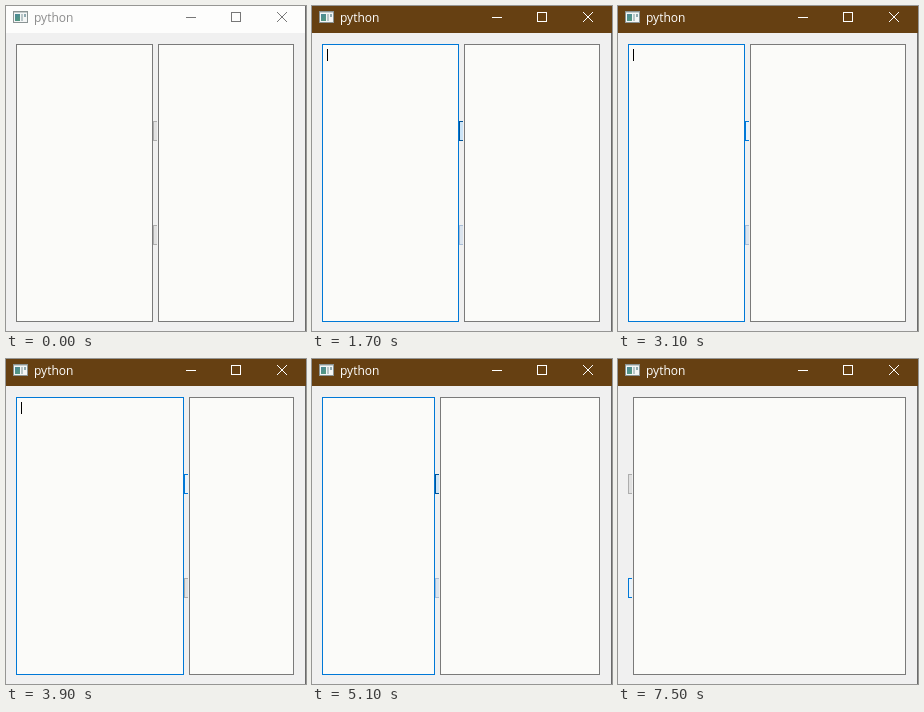
Recreate the animation shown at these times as an HTML page with a canvas. Size 300 px wide and 325 px high, loop 8000 ms.

```html
<!DOCTYPE html>
<html lang="en">
<head>
<meta charset="utf-8">
<title>Splitter window</title>
<style>
  html, body { margin: 0; width: 100%; height: 100%; overflow: hidden; background: #f0f0f0; }
  canvas { display: block; }
</style>
</head>
<body>
<canvas id="stage" width="300" height="325"></canvas>
<script>
const ctx = document.getElementById('stage').getContext('2d');
const LOOP = 8000;
const ACTIVATED = 1700;

// Each track is a list of [start time, value]; values hold until the next entry.
const handleTrack = [
  [0, 147], [1900, 141], [2000, 130], [2100, 122], [2200, 115], [2300, 94], [2400, 82], [2700, 81],
  [3100, 127], [3200, 170], [3300, 212], [3500, 283],
  [3900, 178], [4000, 94], [4100, 10],
  [4900, 81], [5000, 94], [5100, 123], [5300, 141], [5400, 161],
  [6600, 81], [6700, 10]
];
const caretTrack = [
  [0, false], [1700, true], [2200, false], [2700, true], [3200, false],
  [3700, true], [5100, false], [5600, true], [6100, false], [6600, true]
];
const topTrack = [
  [0, 'normal'], [800, 'hover'], [1700, 'pressed'], [1900, 'hover'],
  [5100, 'pressed'], [5600, 'hover'], [6100, 'pressed'], [6600, 'hover'], [7100, 'normal']
];
const bottomTrack = [
  [0, 'normal'], [1700, 'tinted'], [1900, 'normal'], [3100, 'tinted'], [3200, 'normal'],
  [5100, 'tinted'], [5300, 'normal'], [7500, 'hover']
];
const buttonColors = {
  normal: ['#e1e1e1', '#adadad'],
  hover: ['#e9f3fb', '#0078d7'],
  pressed: ['#cce4f7', '#005499'],
  tinted: ['#dbe4ee', '#a9bdd6']
};

function valueAt(track, t) {
  let value;
  for (const [start, v] of track) if (start <= t) value = v;
  return value;
}

function fill(x, y, w, h, color) {
  ctx.fillStyle = color;
  ctx.fillRect(x, y, w, h);
}

function frame(x, y, w, h, inside, border) {
  fill(x, y, w, h, border);
  fill(x + 1, y + 1, w - 2, h - 2, inside);
}

function drawIcon() {
  frame(7, 5, 15, 12, '#f4f6f6', '#8b9494');
  fill(8, 6, 13, 1, '#c5cccc');
  const teal = ctx.createLinearGradient(9, 8, 14, 15);
  teal.addColorStop(0, '#4b8798');
  teal.addColorStop(1, '#559a7d');
  fill(9, 8, 5, 7, teal);
  fill(15, 8, 2, 7, '#b9c6c8');
  fill(18, 8, 2, 3, '#8faab0');
}

function drawTitleBar(active) {
  const ink = active ? '#ffffff' : '#777777';
  fill(0, 0, 300, 27, active ? '#664012' : '#fdfdfc');
  drawIcon();
  ctx.font = '12px "Open Sans", "Noto Sans", sans-serif';
  ctx.fillStyle = active ? '#ffffff' : '#8c8c8c';
  ctx.fillText('python', 28, 16);

  fill(180, 11, 10, 1, ink);
  ctx.strokeStyle = ink;
  ctx.lineWidth = 1;
  ctx.strokeRect(225.5, 6.5, 9, 9);
  ctx.beginPath();
  ctx.moveTo(271, 6);
  ctx.lineTo(281, 16);
  ctx.moveTo(281, 6);
  ctx.lineTo(271, 16);
  ctx.stroke();
}

function drawPane(left, right, border) {
  if (right > left) frame(left, 38, right - left, 278, '#fbfbf9', border);
}

// Only the left end of each button shows inside the narrow handle.
function drawButton(x, y, state) {
  const [inside, border] = buttonColors[state];
  fill(x, y, 4, 20, border);
  fill(x + 1, y + 1, 3, 18, inside);
}

function draw(t) {
  const active = t >= ACTIVATED;
  const handle = valueAt(handleTrack, t);

  fill(0, 0, 300, 325, '#f0f0f0');
  drawTitleBar(active);
  fill(299, active ? 27 : 0, 1, 325, '#6b6b6b');

  drawPane(10, handle, active ? '#0078d7' : '#7a7a7a');
  drawPane(handle + 5, 288, '#7a7a7a');
  drawButton(handle, 115, valueAt(topTrack, t));
  drawButton(handle, 219, valueAt(bottomTrack, t));
  if (handle > 10 && valueAt(caretTrack, t)) fill(15, 43, 1, 12, '#000000');
}

const start = performance.now();
function tick() {
  draw((performance.now() - start) % LOOP);
  requestAnimationFrame(tick);
}
tick();
</script>
</body>
</html>
```
